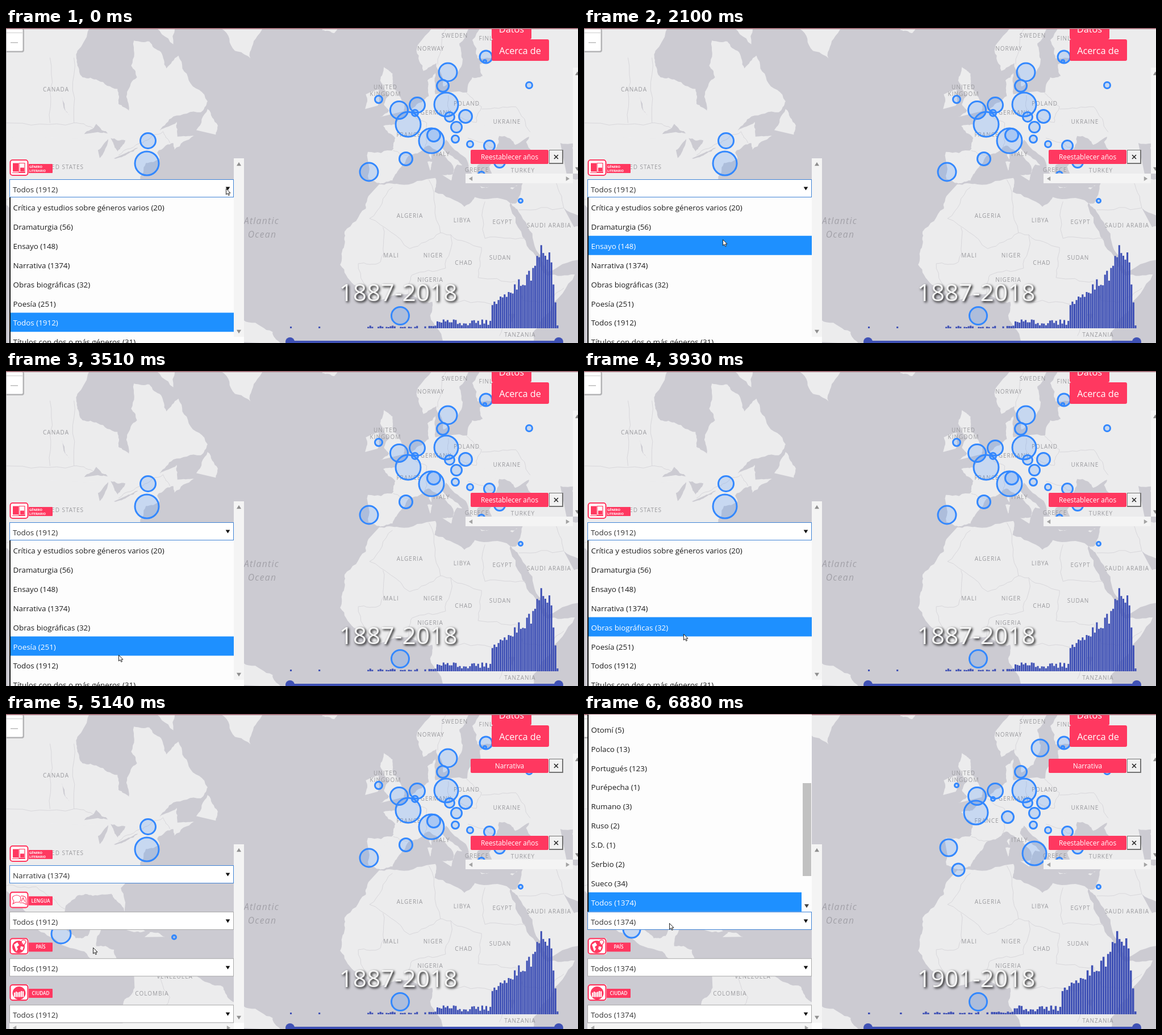
Recreate the animation shown at these times as an HTML page with a canvas. Size 1007 by 556 pixels, loop 8000 ms.

```html
<!DOCTYPE html>
<html lang="es">
<head>
<meta charset="utf-8">
<title>Mapa literario</title>
<style>
html, body { margin: 0; width: 100%; height: 100%; overflow: hidden; background: #cccbd2; }
canvas { display: block; }
</style>
</head>
<body>
<canvas id="stage" width="1007" height="556"></canvas>
<script>
const ctx = document.getElementById('stage').getContext('2d');
const RED = '#ff3860', BLUE = '#1e90ff', INDIGO = '#3f51b5', WATER = '#cccbd2', LAND = '#ececed';
const LOOP = 8000, CLOSE = 5140, UPDATE = 5440, OPEN_LANGUAGE = 6880, TICK = 120;
const LIST_TOP = 299, ROW = 33.9;

const random = i => { const v = Math.sin(i * 12.9898 + 4) * 43758.5453; return v - Math.floor(v); };

// ---- Map: a few "lon lat" key points in Web Mercator, roughened into coastlines ----
const project = (lon, lat) =>
  [692.5 + 6.03 * lon, 507.4 - 345.5 * Math.log(Math.tan(Math.PI / 4 + lat * Math.PI / 360))];

function roughen(path, [x1, y1], [x2, y2], depth) {
  if (!depth) return path.lineTo(x2, y2);
  const length = Math.hypot(x2 - x1, y2 - y1);
  const bend = (random(x1 + y1 * 3 + x2) - .5) * Math.min(.25, 7 / length);
  const middle = [(x1 + x2) / 2 + (y2 - y1) * bend, (y1 + y2) / 2 - (x2 - x1) * bend];
  roughen(path, [x1, y1], middle, depth - 1);
  roughen(path, middle, [x2, y2], depth - 1);
}

function outline(coords) {
  const points = coords.split(',').map(pair => project(...pair.split(' ').map(Number)));
  const path = new Path2D();
  path.moveTo(...points[0]);
  points.slice(1).forEach((p, i) => roughen(path, points[i], p, 3));
  return path;
}

const land = [
  // Canada
  '-115 66,-88 66,-94 61,-94 58.8,-92.5 57,-88 56.5,-82.3 55.1,-82 52.5,-79 51.3,-79.5 54.6,-76.6 57,-78.3 58.8,-77.5 62.4,-73 62.3,-69.6 60.8,-68 58.4,-64.5 60.3,-61.5 56.5,-56 53,-58 51,-66 50.2,-70 47.5,-65 49.2,-64.8 46.3,-60 46.5,-65.7 43.6,-66 45,-70 43.5,-115 43',
  // United States to Panama
  '-115 46,-68 46,-70.7 43,-70 41.7,-74 40.7,-76 36.5,-81.3 31.5,-80.2 25.4,-82.7 28.5,-84 30,-89.5 29.5,-94 29.6,-97.4 27,-97.5 21,-94.5 18.2,-91 18.8,-90 21,-87 21.3,-88.5 16,-83.3 15,-83 10,-77.5 8.5,-80 7.4,-85.7 10.5,-92 14.5,-98.5 16.3,-105.5 20.5,-109.4 25.6,-115 31',
  // South America
  '-77.5 8.5,-75 10.8,-71.7 12.2,-62 10.6,-57.5 6.2,-51.5 4.3,-50 1,-44 -2,-37 -4.8,-34.8 -8,-81 -8,-80.5 0,-77.3 4',
  // Baffin, Greenland, Iceland, Newfoundland, Cuba, Hispaniola
  '-78 66,-73 64.4,-66 61.9,-65 66', '-56 67,-52 64,-48 61,-43.5 59.9,-41.5 63,-38 67', '-24 66,-22.5 63.8,-19 63.4,-13 66',
  '-59.3 47.6,-56 51.6,-53 48.5,-53.6 46.7', '-84.9 21.9,-82 23.1,-74.2 20.2,-77.5 19.9', '-74.4 18.5,-72.8 19.9,-68.4 18.6',
  // Northern Europe
  '-9 37,-9.2 43.1,-1.5 43.4,-1.2 46,-4.7 48.4,-1.5 48.7,4 51.8,8.6 53.9,8.2 56.5,10.5 57.7,10.5 54.2,19.8 54.5,21.3 57,24.3 57.2,23.5 59,30 59.9,22.8 59.9,21.3 62.5,25 66,22 65.8,17.5 62,18.5 59.8,16.4 56.8,12.8 55.5,10.8 59.2,7 58,5 61,12 66,55 66,55 49,10 47,-1.5 43',
  // Mediterranean Europe
  '-9 37,-5.6 36,-2 36.7,0 39.4,3.2 42.5,6 43.1,8.9 44.4,15.7 40,15.7 38,17 40.4,18.4 40.2,12.5 44,13.6 45.7,19.4 41.8,21.5 37.2,23.3 36.8,22.9 40.3,29 41.2,28 43.5,29 45,30 48,10 49,-1.5 44',
  // Western Asia
  '55 51,55 17,43.4 12.7,39.2 21,34.8 29,32.5 31.2,34.2 31.3,36 36.8,30.6 36.6,27.3 37.2,26.2 39.9,29 41.2,35 42,41.5 41.5,37 45.2,39 47.2,33.8 44.6,30.7 46.4,25 47,25 51',
  // Africa
  '-5.9 35.8,0 35.8,10.5 37.3,10.3 34,19 30.3,22 32.7,32.4 31.2,32.5 29.9,37.2 20,43.3 11.5,51.2 11.9,44 1,39 -5,39 -9,13 -9,9 0,9.6 4,6 4.3,3 6.3,-7.5 4.4,-13.3 9,-17.3 14.7,-16.2 19.5,-16 23.8,-9.8 29.8,-9 33',
  // Britain, Ireland, Sicily, Sardinia, Corsica, Crete, Cyprus
  '-5.7 50.1,-3 51.3,-4.5 52.5,-3 54,-5.6 56.5,-4.5 58.6,-2 57.6,-1.6 55.2,1.7 52.6,1.3 51.2', '-10 51.6,-9.8 54.2,-6 55,-6.3 52.2',
  '12.5 38,15.6 38.2,15.1 36.7', '8.2 41,9.6 41,9 39', '8.6 42.4,9.4 43,9.3 41.5', '23.5 35.5,26.2 35.2,24 34.9', '32.3 34.9,34.5 35.6,33 34.6'
].map(outline);

// Great Lakes, Winnipeg, Victoria, Caspian, Persian Gulf
const lakes = [
  '-92 46.8,-88.5 48.8,-84.7 46.8,-88 47.2', '-87.5 41.8,-86.3 43,-85 45.8,-88 43.5', '-84.3 46,-80 45.5,-82.3 43.2,-83.5 45', '-83.4 41.7,-79 42.8,-76.3 44,-79.5 43',
  '-98.5 53.8,-96.4 50.4,-98 51.8', '32 .4,34 .3,33 -2.3', '47 45,53 45,50.5 44,54 37,49 37.5', '48 30,56 26,51 25'
].map(outline);

const borders = [
  '-115 49,-95 49,-89.5 48', '-82 42.4,-75 45,-69 47.3,-67 45', '-115 32,-106 31.8,-97.4 26', '-102 60,-102 49', '-95 60,-95 49', '-72 11.5,-67 1.2,-70 -4',
  '-1.8 43.4,3.2 42.5', '2.5 51,8 49,7.5 43.8', '14.3 54,15 51,22.5 49.1,24 52,19.6 54.4', '24 51.6,34 52,38.2 47.2', '20 46,28.5 43.8', '11.2 59,14 64.5,16 66', '28 60.5,29.5 66',
  '-2 35.1,-8.7 27.3,3 19.2,12 23.5,8.6 36.9', '25 31.6,25 22,36.8 22', '12 23.5,15 23,24 19.5,23 11,34 10', '15 23,13.5 13.7,3.6 11.7,2.7 6.3', '-4.8 25,-5.5 15.5,-12 15,-8 4.5',
  '34.2 10,36 4.5,42 4,48 8', '15 4,30.8 3.5,29.2 -6', '36 36.5,44.8 37.2,48 30,34.9 29.5'
].map(outline);

const countries = [
  ['CANADA', 88, 108], ['UNITED STATES', 95, 245], ['SWEDEN', 790, 13], ['FINLAND', 857, 18], ['NORWAY', 748, 36], ['UNITED', 668, 104],
  ['KINGDOM', 668, 116], ['POLAND', 811, 133], ['GERMANY', 757, 149], ['FRANCE', 709, 188], ['UKRAINE', 882, 165], ['ITALY', 767, 222],
  ['ALGERIA', 711, 331], ['LIBYA', 803, 339], ['EGYPT', 874, 342], ['SAUDI ARABIA', 956, 348], ['MALI', 678, 401], ['NIGER', 752, 401],
  ['CHAD', 806, 414], ['SUDAN', 870, 405], ['NIGERIA', 747, 444], ['TANZANIA', 905, 541], ['GREECE', 829, 250], ['TURKEY', 910, 251],
  ['VENEZUELA', 297, 463], ['COLOMBIA', 257, 493]
];

// ---- Markers: [x, y, outer radius] ----
const sharedMarkers = [
  [250, 199, 15], [248, 239, 22.5], [845, 51, 12.5], [843, 59, 4], [769, 102, 12], [921, 101, 7], [775, 135, 22.5], [692, 145, 17],
  [724, 136, 15], [781, 157, 10], [809, 156, 13], [793, 175, 11], [791, 196, 8], [817, 205, 7], [851, 208, 11],
  [869, 237, 11], [837, 259, 7], [906, 305, 5], [694, 508, 17]
];
const allMarkers = [[778, 78, 17.5], [656, 126, 8], [720, 150, 7], [708, 170, 23.5], [749, 199, 23.5], [753, 189, 13], [704, 231, 13], [639, 254, 17.5], [97, 388, 18.5], [296, 394, 5]];
const novelMarkers = [[803, 60, 16.5], [656, 126, 5], [720, 150, 5], [690, 174, 22.5], [746, 182, 12], [659, 275, 12.5], [642, 236, 16.5], [793, 246, 22.5], [84, 380, 16.5]];

// ---- Histogram: sparse early years, then a rise to a peak and a steep drop ----
const allYears = { first: 1887, sparseUntil: 636 }, novelYears = { first: 1901, sparseUntil: 596 };
const LAST_YEAR = 2018, RECENT = 1986;

function barHeight(year, x, sparseUntil) {
  const r = random(year), u = (year - RECENT) / (LAST_YEAR - RECENT);
  if (u >= 0) {
    const trend = 40 + 92 * u + 32 * Math.exp(-(((u - .77) / .08) ** 2));
    return trend * (.88 + .24 * r) * Math.min(1, 9 * (1 - u) + .04);
  }
  if (x < sparseUntil) return year % 14 === 11 && x < 560 ? 3 : 0;
  return x > 755 ? 5 + 11 * r : r > .35 ? 5 * r : 0;
}

// ---- Pointer: [start, steps, x, y] moves evenly from the last stop ----
const moves = [
  [680, 4, 324, 317], [1190, 1, 319, 320], [1340, 4, 262, 361], [2100, 3, 209, 397], [2490, 4, 206, 440], [3000, 1, 206, 449],
  [3150, 4, 198, 501], [3660, 1, 197, 508], [3810, 4, 153, 420], [4320, 2, 153, 406], [4590, 2, 153, 412], [6280, 6, 150, 369]
];

function pointerAt(t) {
  let x = 387, y = 283;
  for (const [start, steps, toX, toY] of moves) {
    if (t < start) break;
    const part = Math.min(1, (Math.floor((t - start) / TICK) + 1) / steps);
    x += (toX - x) * part;
    y += (toY - y) * part;
  }
  return [x, y];
}

const genres = ['Crítica y estudios sobre géneros varios (20)', 'Dramaturgia (56)', 'Ensayo (148)', 'Narrativa (1374)', 'Obras biográficas (32)', 'Poesía (251)', 'Todos (1912)', 'Títulos con dos o más géneros (31)'];
const languages = ['Otomí (5)', 'Polaco (13)', 'Portugués (123)', 'Purépecha (1)', 'Rumano (3)', 'Ruso (2)', 'S.D. (1)', 'Serbio (2)', 'Sueco (34)', 'Todos (1374)'];

// ---- Drawing helpers ----
function rect(x, y, w, h, color, radius = 0) {
  ctx.fillStyle = color;
  ctx.beginPath();
  ctx.roundRect(x, y, w, h, radius);
  ctx.fill();
}

function text(str, x, y, size, color, { align = 'left', style = '', spacing = 0 } = {}) {
  ctx.font = `${style} ${size}px "Open Sans", "Noto Sans", sans-serif`;
  ctx.textAlign = align;
  ctx.letterSpacing = spacing + 'px';
  ctx.fillStyle = color;
  ctx.fillText(str, x, y);
}

function strokePath(d, color, width) {
  ctx.strokeStyle = color;
  ctx.lineWidth = width;
  ctx.stroke(new Path2D(d));
}

function triangle(x, y, size, angle, color) {
  ctx.save();
  ctx.translate(x, y);
  ctx.rotate(angle * Math.PI / 180);
  ctx.fillStyle = color;
  ctx.fill(new Path2D(`M${-size} ${-size * .8}H${size}L0 ${size * .8}z`));
  ctx.restore();
}

function circle(x, y, r) {
  ctx.beginPath();
  ctx.arc(x, y, r, 0, 7);
}

function drawMap() {
  rect(0, 0, 1007, 556, WATER);
  ctx.fillStyle = LAND;
  land.forEach(p => ctx.fill(p));
  ctx.strokeStyle = '#d8d7db';
  ctx.lineWidth = 1;
  borders.forEach(p => ctx.stroke(p));
  ctx.fillStyle = WATER;
  lakes.forEach(p => ctx.fill(p));
  for (const [name, x, y] of countries) text(name, x, y + 3.6, 10, '#9b9b9f', { align: 'center', spacing: 1 });
  const ocean = { align: 'center', style: 'italic', spacing: 1.3 };
  text('Atlantic', 450, 346, 15.7, '#a2a1a8', ocean);
  text('Ocean', 451, 370, 15.7, '#a2a1a8', ocean);
}

function drawMarkers(markers) {
  ctx.lineWidth = 3;
  ctx.strokeStyle = '#3388ff';
  ctx.fillStyle = 'rgba(51,136,255,.2)';
  for (const [x, y, r] of markers) {
    circle(x, y, r - 1.5);
    ctx.fill();
    ctx.stroke();
  }
}

function drawTimeline({ first, sparseUntil }) {
  const step = 473 / (LAST_YEAR - first + 1);
  for (let year = first; year <= LAST_YEAR; year++) {
    const x = 500 + (year - first) * step, h = barHeight(year, x, sparseUntil);
    rect(x, 530 - h, step - .5, h, INDIGO);
  }
  rect(500, 552, 473, 4, INDIGO);
  for (const x of [500, 973]) { circle(x, 554, 8); ctx.fill(); }
  ctx.save();
  ctx.shadowColor = '#000';
  ctx.shadowBlur = 4;
  ctx.shadowOffsetX = ctx.shadowOffsetY = 2;
  text(`${first}-${LAST_YEAR}`, 586.5, 482, 42.5, '#f4f4f4');
  ctx.restore();
}

function drawChip(label, y) {
  rect(818, y, 137, 25, RED, 2);
  text(label, 886.5, y + 17, 11.9, '#fff', { align: 'center' });
  rect(956, y, 25, 25, '#747474');
  rect(957, y + 1, 22, 22, '#f1f1f1');
  strokePath(`M965 ${y + 9}l7 7m0 -7l-7 7`, '#222', 1.5);
}

function drawRightPanel(filtered) {
  rect(855, -18, 70, 38, RED, 3);
  text('Datos', 890, 8, 16.3, '#fff', { align: 'center' });
  rect(855, 20, 101, 38, RED, 3);
  text('Acerca de', 905, 46, 16.3, '#fff', { align: 'center' });
  rect(998, 70, 9, 187, '#f4f4f4');
  rect(809, 257, 189, 17, '#f4f4f4');
  triangle(1006, 80, 4, 180, '#8a8a8a');
  triangle(1006, 249, 4, 0, '#8a8a8a');
  triangle(818, 266, 4, 90, '#a3a3a3');
  triangle(989, 266, 4, -90, '#a3a3a3');
  if (filtered) drawChip('Narrativa', 79);
  drawChip('Reestablecer años', 215);
}

function drawBadge(lines, y, glyph) {
  rect(38, y + 8, 44, 16, RED, 1);
  rect(7, y, 33, 29, '#fff', 4);
  ctx.strokeStyle = RED;
  ctx.lineWidth = 2.2;
  ctx.beginPath();
  ctx.roundRect(7.5, y + 1, 31, 27, 4);
  ctx.stroke();
  ctx.save();
  ctx.translate(23, y + 14.5);
  glyph();
  ctx.restore();
  if (lines.length > 1) lines.forEach((s, i) => text(s, 41, y + 15 + 6.5 * i, 5.6, '#fff', { style: 'bold' }));
  else text(lines[0], 61, y + 19, 8.2, '#fff', { align: 'center', style: '600' });
}

const glyphs = {
  book() {
    rect(-11, -8, 10, 15, RED);
    strokePath('M0 -8H10V8H0zM-12 9H11', RED, 1.2);
    rect(2, 0, 7, 7, RED);
  },
  tongues() {
    strokePath('M-11 -6Q-4 -11 2 -6Q5 0 0 4H-6L-11 7L-9 2Q-13 -2 -11 -6M3 -7Q14 -8 12 2L13 8L7 5H1M4 3L7 -4L10 3', RED, 1.1);
  },
  globe() {
    ctx.fillStyle = RED;
    circle(-1, 1, 11);
    ctx.fill();
    ctx.fillStyle = '#fff';
    ctx.fill(new Path2D('M-9 -3L-3 -7L0 -2L-4 1L-2 5L-5 9L-7 3zM3 0L8 1L6 7L2 5z'));
    circle(8, -7, 4);
    ctx.fill();
    strokePath('M8 -1L4 -7A4 4 0 1 1 12 -7z', RED, 1.4);
  },
  city() {
    ctx.fillStyle = RED;
    circle(0, 1, 11.5);
    ctx.fill();
    for (let i = 0; i < 6; i++) {
      const h = 5 + 7 * random(i);
      rect(-9 + 3 * i, 8 - h, 2.2, h, '#fff');
    }
  }
};

function drawSelect(value, y, focused) {
  rect(6, y, 395, 32, focused ? '#3f83d6' : '#a9a9a9');
  rect(7, y + 1, 393, 30, '#fff');
  text(value, 12, y + 22.5, 13.4, '#333');
  triangle(390.5, y + 16.5, 3.8, 0, '#111');
}

function drawLeftPanel(t) {
  const other = `Todos (${t < UPDATE ? 1912 : 1374})`;
  rect(401, 230, 18, 315, '#f4f4f4');
  rect(401, 545, 18, 11, '#fdfdfd');
  rect(6, 546, 395, 10, '#f4f4f4');
  triangle(410, 240, 4, 180, '#8f8f8f');
  triangle(410, 536, 4, 0, '#8f8f8f');
  triangle(15, 554, 4, 90, '#a3a3a3');
  triangle(392, 554, 4, -90, '#a3a3a3');
  const badges = [[['GÉNERO', 'LITERARIO'], glyphs.book], [['LENGUA'], glyphs.tongues], [['PAÍS'], glyphs.globe], [['CIUDAD'], glyphs.city]];
  badges.forEach(([lines, glyph], i) => {
    drawBadge(lines, 232 + 81.7 * i, glyph);
    const value = i ? other : t < CLOSE ? 'Todos (1912)' : 'Narrativa (1374)';
    drawSelect(value, 267 + 82.1 * i, i === (t < OPEN_LANGUAGE ? 0 : 1));
  });
}

function drawOptions(options, top, selected, width) {
  options.forEach((option, i) => {
    const y = top + ROW * i, active = i === selected;
    if (active) rect(8, y, width, ROW, BLUE);
    text(option, 12.5, y + 23, 13.4, active ? '#fff' : '#1c1c1c');
  });
}

function drawPopups(t, pointerY) {
  if (t < CLOSE) {
    rect(6, LIST_TOP, 2, 257, '#111');
    rect(8, LIST_TOP, 393, 257, '#fdfdfd');
    const hovered = Math.floor((pointerY - LIST_TOP) / ROW);
    drawOptions(genres, LIST_TOP, hovered < 0 ? genres.indexOf('Todos (1912)') : hovered, 393);
  } else if (t >= OPEN_LANGUAGE) {
    rect(6, 1, 2, 348, '#111');
    rect(8, 1, 393, 348, '#fdfdfd');
    drawOptions(languages, 9.7, languages.length - 1, 375);
    rect(385, 122, 15, 164, '#c1c1c1');
    triangle(392, 339, 4, 0, '#444');
  }
}

function drawPointer(x, y) {
  const arrow = new Path2D('M.5 .5V11L3 8.8L4.8 12.6L6.5 11.8L4.8 8.2H8z');
  ctx.save();
  ctx.translate(Math.round(x), Math.round(y));
  ctx.fillStyle = '#fff';
  ctx.fill(arrow);
  ctx.strokeStyle = '#222';
  ctx.lineWidth = 1;
  ctx.stroke(arrow);
  ctx.restore();
}

function render() {
  const t = performance.now() % LOOP;
  const [x, y] = pointerAt(t);
  const updated = t >= UPDATE;
  drawMap();
  drawMarkers([...sharedMarkers, ...(updated ? novelMarkers : allMarkers)]);
  drawTimeline(updated ? novelYears : allYears);
  rect(-4, 1, 36, 42, '#b4b4b6', 4);
  rect(-4, 1, 33.5, 39.5, '#fff', 2);
  rect(0, 8, 29, 1, '#ccc');
  rect(8, 25, 13, 1.5, '#bbb');
  drawRightPanel(t >= CLOSE);
  rect(0, 0, 1, 556, '#a9a8ac');
  rect(0, 0, 1007, 2, '#a3727b');
  drawLeftPanel(t);
  drawPopups(t, y);
  drawPointer(x, y);
  requestAnimationFrame(render);
}
render();
</script>
</body>
</html>
```
